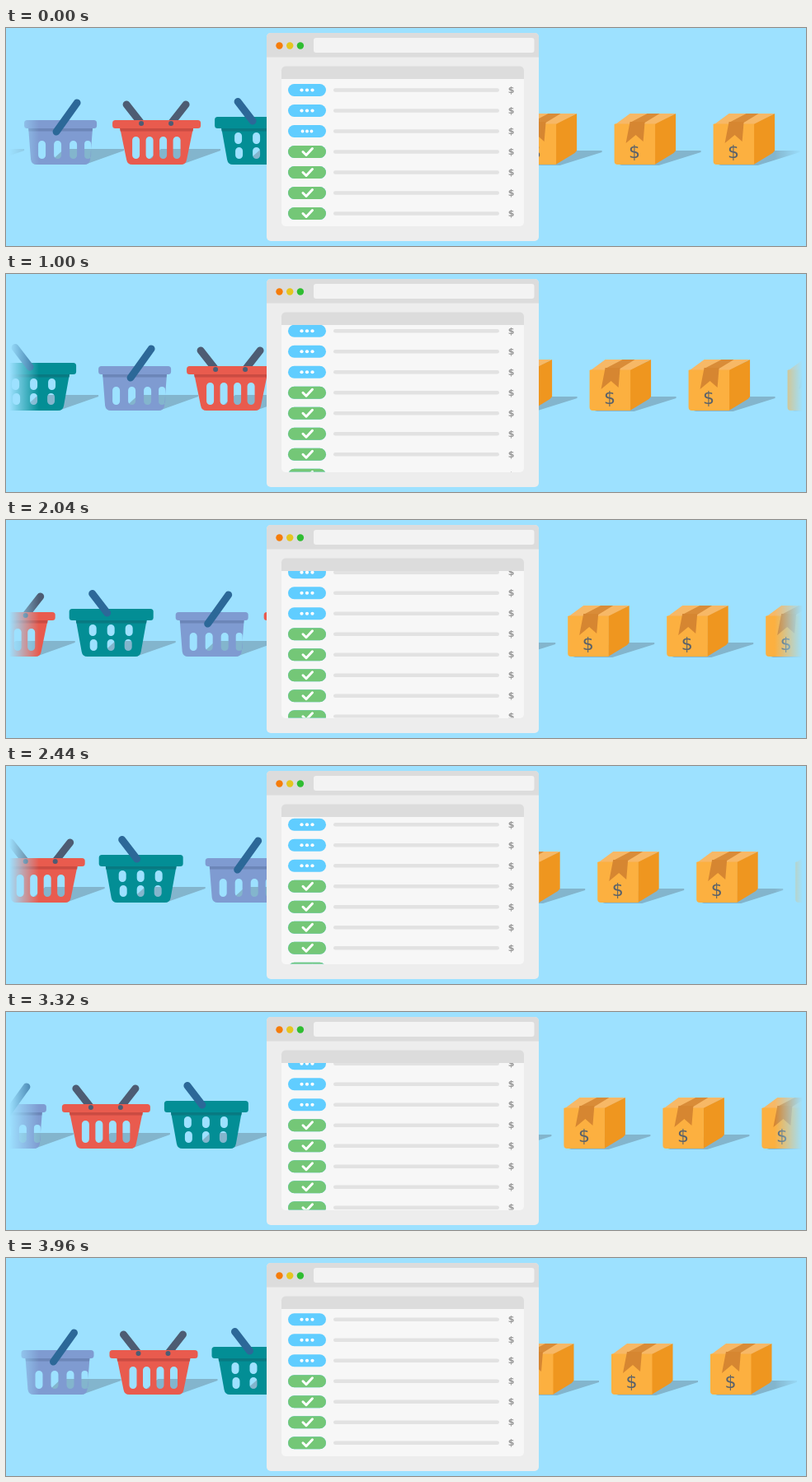
Recreate the animation shown at these times as an HTML page with a canvas. Size 970x265 px, loop 4000 ms.

```html
<!DOCTYPE html>
<html lang="en">
<head>
<meta charset="utf-8">
<title>Baskets to parcels</title>
<style>
  html, body { margin: 0; width: 100%; height: 100%; overflow: hidden; background: #9de1ff; }
  canvas { display: block; }
</style>
</head>
<body>
<canvas id="stage" width="970" height="265"></canvas>
<script>
const ctx = document.getElementById('stage').getContext('2d');
const LOOP = 4000, TRAVEL = 360, ROW_GAP = 25, ROW_TIME = LOOP / 3;
const SKY = '157,225,255', SHADOW = '#83b5cd';
const clamp = v => Math.max(0, Math.min(1, v));
const progress = (v, from, to) => clamp((v - from) / (to - from));

function poly(color, ...points) {
  ctx.fillStyle = color;
  ctx.beginPath();
  points.forEach(([x, y]) => ctx.lineTo(x, y));
  ctx.closePath();
  ctx.fill();
}

function rounded(color, x, y, w, h, radius) {
  ctx.fillStyle = color;
  ctx.beginPath();
  ctx.roundRect(x, y, w, h, radius);
  ctx.fill();
}

function circle(color, x, y, r) {
  ctx.fillStyle = color;
  ctx.beginPath();
  ctx.arc(x, y, r, 0, Math.PI * 2);
  ctx.fill();
}

function stroke(color, width, ...points) {
  ctx.strokeStyle = color;
  ctx.lineWidth = width;
  ctx.lineCap = ctx.lineJoin = 'round';
  ctx.beginPath();
  points.forEach(([x, y]) => ctx.lineTo(x, y));
  ctx.stroke();
}

function dollar(color, font, x, y) {
  ctx.fillStyle = color;
  ctx.font = font + ' "DejaVu Sans", sans-serif';
  ctx.textAlign = 'center';
  ctx.fillText('$', x, y);
}

// Tapered body with real openings, so that the shadow shows through.
function basketBody({ color, dark, width, inset, foot, holes }) {
  const right = width - inset, footRight = width - foot;
  ctx.fillStyle = color;
  ctx.beginPath();
  ctx.moveTo(inset, 121);
  ctx.lineTo(right, 121);
  ctx.lineTo(footRight + 1, 160);
  ctx.quadraticCurveTo(footRight, 166, footRight - 6, 166);
  ctx.lineTo(foot + 6, 166);
  ctx.quadraticCurveTo(foot, 166, foot - 1, 160);
  ctx.closePath();
  for (const [x, y, w, h] of holes) ctx.roundRect(x, y, w, h, 4.5);
  ctx.fill('evenodd');
  poly(dark, [inset, 121], [right, 121], [right - 0.5, 125.5], [inset + 0.5, 125.5]);
}

const baskets = [
  {
    start: 22, width: 88, inset: 5, foot: 9, tip: 121, rimTop: 112,
    color: '#7f9bd1', dark: '#6c86b8',
    holes: [17, 36, 55, 73].map((x, i) => [x, 137, i < 3 ? 9 : 8, 22]),
    front() { stroke('#2c6898', 9, [64, 91], [39, 126]); }
  },
  {
    start: 129, width: 107, inset: 9, foot: 18, tip: 131, rimTop: 112,
    color: '#e95b4e', dark: '#ca4b42',
    holes: [24, 40.5, 57, 73.5].map(x => [x, 132, 9, 27]),
    back() {
      stroke('#4d5c73', 9, [17, 93], [35, 116]);
      stroke('#4d5c73', 9, [89, 93], [71, 116]);
    },
    front() {
      circle('#4d5c73', 35, 116, 3);
      circle('#4d5c73', 71, 116, 3);
    }
  },
  {
    start: 253, width: 102, inset: 8, foot: 16, tip: 129, rimTop: 108,
    color: '#038e95', dark: '#087a82',
    holes: [24, 46, 68].flatMap((x, i) => [[x, 127, 9, 14], [x + 1 - i, 145, 9, 14]]),
    front() { stroke('#2c6898', 9, [28, 89.5], [46, 113]); }
  }
];

function drawBasket(basket, x) {
  const { width, rimTop, color, tip, foot } = basket;
  ctx.save();
  ctx.translate(x, 0);
  poly(SHADOW, [foot + 20, 165], [width * 0.55, 147], [tip, 147], [tip, 149], [width - foot - 4, 165.5]);
  basket.back?.();
  basketBody(basket);
  rounded(color, 0, rimTop, width, 122 - rimTop, 3.5);
  basket.front();
  ctx.restore();
}

function drawParcel(x) {
  ctx.save();
  ctx.translate(x, 0);
  poly(SHADOW, [6, 167], [58, 149], [105, 149], [105, 151], [54, 167]);
  poly('#f7b866', [0, 118], [19, 104], [74, 104], [49, 118]);
  poly('#ef961f', [49, 117], [74.5, 104], [74.5, 149], [72, 152], [49, 166]);
  rounded('#fcb040', 0, 116.5, 49.5, 49.5, [1, 0, 0, 4]);
  poly('#d98c38', [19, 115], [37, 115], [55, 104], [40, 104]);
  poly('#d68631', [19, 114], [37, 114], [35, 138], [26, 130], [14, 140]);
  dollar('#5b6269', '22px', 24.5, 158);
  ctx.restore();
}

function drawCheck(y, scale) {
  ctx.save();
  ctx.translate(365.5, y);
  ctx.scale(scale, scale);
  stroke('#fff', 3, [-5.5, 0], [-1.5, 4], [6, -4]);
  ctx.restore();
}

function pill(color, y, shrink = 0) {
  rounded(color, 342 + shrink, y - 7.5 + shrink, 46 - 2 * shrink, 15 - 2 * shrink, 7.5 - shrink);
}

// Dots gather into one, a small tick appears, then it grows as the pill turns green.
function drawStatus(y, phase) {
  const tick = 0.5 * progress(phase, 80, 130) + 0.5 * progress(phase, 600, 650);
  pill('#60cdff', y);
  if (tick > 0) {
    ctx.globalAlpha = tick;
    pill('#74c777', y, 1.5 * (1 - progress(phase, 133, 400)));
    ctx.globalAlpha = 1;
    drawCheck(y, tick);
  } else {
    const gap = 6.5 * (1 - progress(phase, -12, 67));
    for (const side of [-1, 0, 1]) circle('#fff', 365 + side * gap, y, phase < 0 ? 2.1 : 1.9);
  }
}

function drawRows(time) {
  const phase = time % ROW_TIME;
  ctx.save();
  ctx.beginPath();
  ctx.rect(334, 62, 294, 178.5);
  ctx.clip();
  for (let i = -1; i < 7; i++) {
    const y = 75.5 + ROW_GAP * (i + phase / ROW_TIME);
    drawStatus(y, i < 2 ? -100 : i > 2 ? ROW_TIME : phase);
    rounded('#e2e2e2', 397, y - 2.25, 201, 4.5, 2.25);
    dollar('#999', 'bold 11px', 612.5, y + 3.5);
  }
  ctx.restore();
}

function drawWindow(time) {
  rounded('#ededed', 316, 6, 330, 253, 5);
  rounded('#dcdcdc', 316, 6, 330, 29.5, [5, 5, 0, 0]);
  ['#f57c0a', '#e6c51f', '#2fbd31'].forEach((color, i) => circle(color, 331.5 + 12.7 * i, 21.5, 4.2));
  rounded('#f3f3f3', 373, 12, 267.5, 18, 3);
  rounded('#f7f7f7', 334, 47, 294, 194, 5);
  rounded('#dcdcdc', 334, 46.5, 294, 15.5, [5, 5, 0, 0]);
  drawRows(time);
}

function fade(solidX, clearX) {
  const gradient = ctx.createLinearGradient(solidX, 0, clearX, 0);
  gradient.addColorStop(0, `rgba(${SKY},1)`);
  gradient.addColorStop(1, `rgba(${SKY},0)`);
  ctx.fillStyle = gradient;
  if (solidX < clearX) ctx.fillRect(0, 60, clearX, 180);
  else ctx.fillRect(clearX, 60, 970 - clearX, 180);
}

function draw(now) {
  const time = now % LOOP;
  const shift = TRAVEL * time / LOOP;
  ctx.fillStyle = `rgb(${SKY})`;
  ctx.fillRect(0, 0, 970, 265);
  for (const basket of baskets) {
    drawBasket(basket, basket.start + shift - TRAVEL);
    drawBasket(basket, basket.start + shift);
  }
  // The window hides baskets past its left edge; parcels own the right side.
  ctx.fillStyle = `rgb(${SKY})`;
  ctx.fillRect(480, 0, 490, 265);
  for (let i = 0; i < 4; i++) drawParcel(497.5 + 120 * i + shift % 120);
  fade(4, 40);
  fade(966, 932);
  drawWindow(time);
  requestAnimationFrame(draw);
}
requestAnimationFrame(draw);
</script>
</body>
</html>
```
